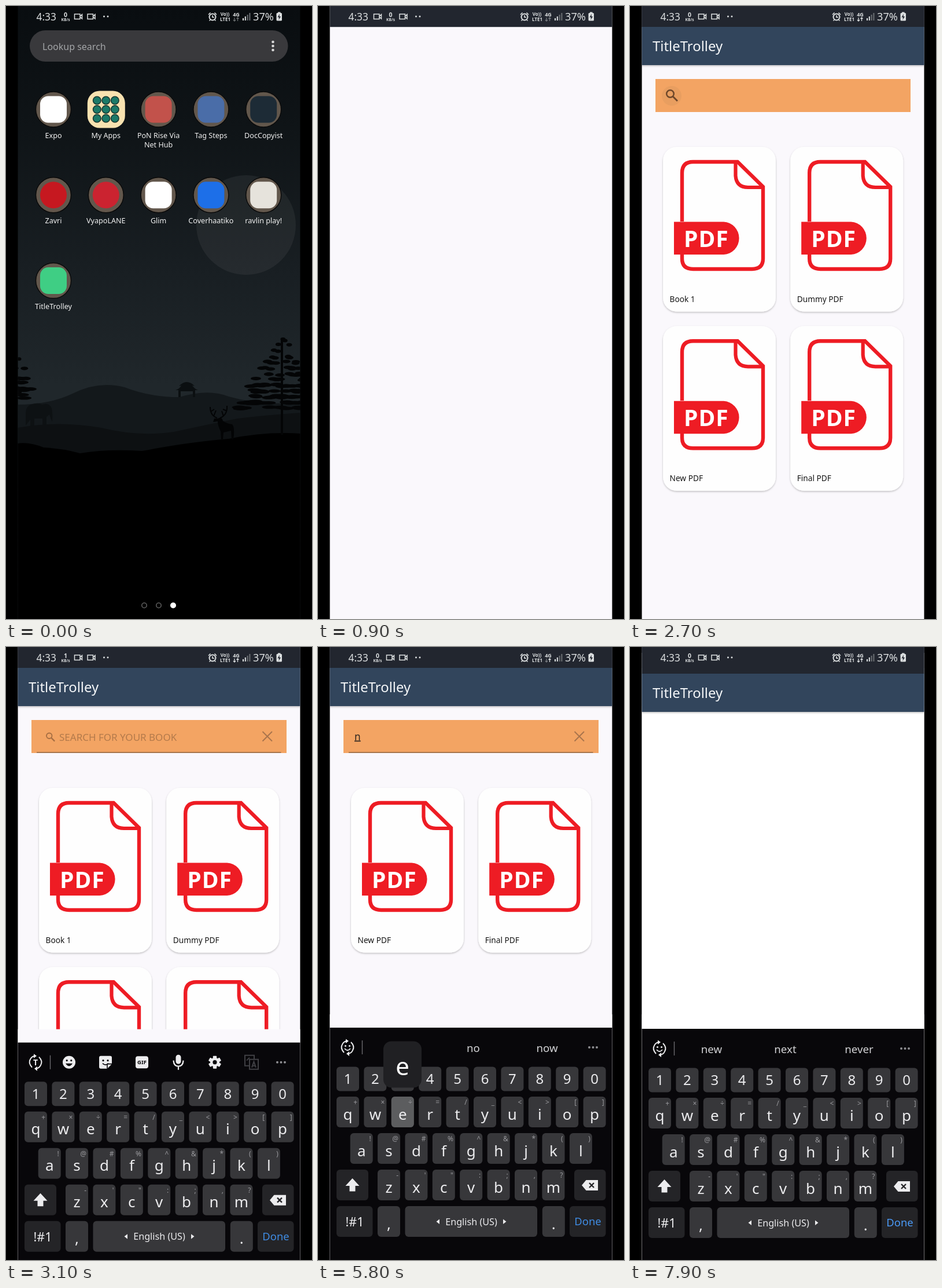
An HTML page that plays this animation: 529 by 1058 pixels, repeating every 8000 ms.

```html
<!DOCTYPE html>
<html lang="en">
<head>
<meta charset="utf-8">
<title>Book search on a phone</title>
<style>
html, body { margin: 0; width: 100%; height: 100%; overflow: hidden; background: #000; }
svg { display: block; width: 100vw; height: 100vh; font-family: "Noto Sans", "Open Sans", sans-serif; }
.line { fill: none; stroke: currentColor; }
</style>
</head>
<body>
<svg id="stage" viewBox="0 0 529 1058"></svg>
<script>
const LOOP = 8000, STEP = 100;
const PALE = '#faf8fc', RED = '#ee1c24', NAVY = '#30455c', ORANGE = '#f3a463', ICON = '#dcdfe0';

const text = (x, y, size, fill, s, more = '') =>
  `<text x="${x}" y="${y}" font-size="${size}" fill="${fill}" ${more}>${s}</text>`;
const mid = (x, y, size, fill, s, more = '') => text(x, y, size, fill, s, 'text-anchor="middle" ' + more);
const rect = (x, y, w, h, fill, r = 0, more = '') =>
  `<rect x="${x}" y="${y}" width="${w}" height="${h}" rx="${r}" fill="${fill}" ${more}/>`;
const dot = (x, y, r, fill, more = '') => `<circle cx="${x}" cy="${y}" r="${r}" fill="${fill}" ${more}/>`;
const path = (d, fill, more = '') => `<path d="${d}" fill="${fill}" ${more}/>`;
const line = (d, color, w, more = '') => `<path d="${d}" class="line" color="${color}" stroke-width="${w}" ${more}/>`;
const group = (id, body, more = '') => `<g id="${id}" ${more}>${body}</g>`;
const at = (x, y, body) => `<g transform="translate(${x} ${y})">${body}</g>`;

let seed = 7;
const rnd = () => (seed = seed * 16807 % 2147483647) / 2147483647;

// Home screen
function foliage(cx, top, height, spread, count) {
  let out = '';
  for (let i = 0; i < count; i++) {
    const k = Math.sqrt(rnd()), x = cx + (rnd() * 2 - 1) * (5 + k * spread);
    const y = top + Math.round(k * 12) / 12 * height + rnd() * 4;
    out += `<ellipse cx="${x.toFixed(1)}" cy="${y.toFixed(1)}" rx="${(4 + k * 9).toFixed(1)}" ry="3"/>`;
  }
  return `<g fill="#040506">${out}</g>`;
}

function wallpaper() {
  const pagoda = path('M293 663Q301 660 303 655L299 656Q306 649 312 649Q320 649 326 656L322 655Q325 660 332 663H327V675H323V665H302V675H298V663Z', '#0b0f11');
  const elephant = path('M34 724V704Q34 689 46 687Q56 684 63 688Q74 684 79 694Q81 704 80 718Q77 712 75 705Q72 708 70 709V726H63V712H49V726H42V714Z', '#0d1113');
  const deer = path('M366 712Q373 708 375 716Q382 721 391 722Q395 725 394 741L393 748H390L389 733L376 736L375 749H372L371 734Q366 724 366 717L358 718L360 712Z', '#030405')
    + line('M365 711Q353 707 353 692M354 700L360 696M370 711Q383 706 382 690M382 699L375 696M359 708L363 698M376 708L373 699', '#030405', 2);
  return rect(20, 0, 489, 1058, 'url(#sky)') + dot(415, 378, 86, '#fff', 'opacity=".055"')
    + path('M20 688Q75 688 115 669Q160 646 205 658Q248 675 300 675Q350 660 385 674Q440 690 509 684V800H20Z', '#13181b')
    + pagoda + elephant + foliage(18, 608, 66, 32, 30)
    + path('M20 728Q90 715 165 728Q230 744 290 735Q350 722 400 712Q450 706 509 702V800H20Z', '#0d1012')
    + path('M20 755Q40 752 65 762Q100 764 128 772Q175 764 235 768Q320 752 385 747Q450 734 509 738V1058H20Z', '#000')
    + deer + line('M477 573V740', '#040506', 4) + foliage(477, 574, 118, 72, 125);
}

const APPS = [
  ['Expo', '', '#fff', 1], ['My Apps', '', '', 2], ['PoN Rise Via', 'Net Hub', '#c2524b', 1],
  ['Tag Steps', '', '#4a6da8', 1], ['DocCopyist', '', '#1d2b36', 1], ['Zavri', '', '#c61820', 0],
  ['VyapoLANE', '', '#cb2330', 0], ['Glim', '', '#fff', 1], ['Coverhaatiko', '', '#1d6fe8', 1],
  ['ravlin play!', '', '#e6e3dc', 1], ['TitleTrolley', '', '#3fce84', 1]
];

function folder() {
  let out = rect(-32, -32, 65, 64, '#f8e2b0', 21);
  for (let i = 0; i < 9; i++)
    out += dot((i % 3 - 1) * 15.5, (Math.floor(i / 3) - 1) * 15.5, 6.8, '#1c7a68', 'stroke="#17352f" stroke-width="1.5"');
  return out;
}

function appIcon([name, second, color, kind], i) {
  const x = 82 + i % 5 * 90.8, y = 178.5 + Math.floor(i / 5) * 147.8;
  const tile = kind === 2 ? folder()
    : dot(0, 0, 30.5, '#62574c', 'stroke="#0a0a0a" stroke-width="1.5"')
      + (kind ? rect(-23, -23, 46, 46, color, 14) : dot(0, 0, 23, color));
  return at(x, y, (i === 10 ? group('tapped', tile) : tile)
    + mid(0, 49, 12.6, '#f2f2f2', name) + (second && mid(0, 65, 12.6, '#f2f2f2', second)));
}

const home = () => wallpaper() + rect(41, 42, 446.5, 54, '#39393c', 27)
  + text(63, 75.5, 16, '#a3a5a7', 'Lookup search')
  + [62, 69, 76].map(y => dot(461.5, y, 2.3, '#d8d8d8')).join('')
  + APPS.map(appIcon).join('')
  + [239, 264].map(x => dot(x, 1034.5, 4.2, 'none', 'stroke="#5c5c5c" stroke-width="1.6"')).join('')
  + dot(289, 1034.5, 5, '#fff');

// Status bar
function statusBar() {
  const cam = line('M-6.5 -4H3V4.5H-6.5ZM3 0L6.5 -3.5V4L3 .8', ICON, 1.5);
  const bold = 'font-weight="600"';
  const alarm = dot(0, 1, 5.5, 'none', `stroke="${ICON}" stroke-width="2"`)
    + line('M0 -2V1.5H3M-7 -3L-3.5 -6.5M7 -3L3.5 -6.5M-4 6L-5.5 7.5M4 6L5.5 7.5', ICON, 1.6);
  const bars = [4, 7, 10, 13].map((h, i) => rect(409 + i * 3.8, 25 - h, 2, h, i < 2 ? ICON : '#6c7074')).join('');
  return text(52.5, 24.5, 17.3, ICON, '4:33')
    + group('cam', cam) + at(147.5, 18, cam)
    + group('speed', mid(0, 18.5, 10.5, ICON, '0', bold + ' id="rate"') + mid(0, 25.5, 6.6, ICON, 'KB/s', bold))
    + dot(169.5, 18, 1.5, ICON) + dot(176, 18, 1.5, ICON)
    + at(357, 18, alarm)
    + mid(378.5, 17, 8, ICON, 'Vo))', bold) + mid(379, 25.5, 8, ICON, 'LTE1', bold) + mid(398, 18, 9, ICON, '4G', bold)
    + line('M395 20V26M393 24L395 26L397 24', ICON, 1.3, 'id="down"')
    + line('M400.5 26V20M398.5 22L400.5 20L402.5 22', ICON, 1.3, 'id="up"')
    + bars + text(427, 24.5, 18.2, ICON, '37%')
    + rect(467.5, 12, 9.5, 13.5, ICON, 1.5) + rect(470, 10.5, 4.5, 2, ICON)
    + path('M473 13.5L469.5 19.5H472L471.5 24L475 18H472.5Z', '#22262f');
}

// Book list
function pdfCard(i) {
  const page = line('M90 372V288Q90 269 109 269H186L230 312V436Q230 454 211 454H109Q90 454 90 436V428', RED, 6.4)
    + line('M182.5 269V293Q184 313 204 313H231', RED, 6.2)
    + path('M76 372.5H162A28.3 28.3 0 0 1 162 429H76Z', RED)
    + text(93, 416, 39, '#fff', 'PDF', 'font-weight="600" letter-spacing="1"');
  return group('card' + i, rect(57, 243, 195, 284.5, '#fefefe', 24, 'filter="url(#lift)"') + page
    + text(68.5, 511, 13.7, '#161616', '', `id="name${i}"`),
    `transform="translate(${i % 2 * 220.2} ${i > 1 ? 309.3 : 0})"`);
}

const glass = (x, y, s, color) => at(x, y, `<g transform="scale(${s})">`
  + dot(-3, -3, 6.3, 'none', `stroke="${color}" stroke-width="2.5"`) + line('M1.5 1.5L9.5 9.5', color, 2.9) + '</g>');

const header = () => rect(20, 0, 489, 36.2, '#22262f')
  + rect(20, 36, 489, 66, NAVY, 0, 'filter="url(#lift)"') + text(39, 78, 23.9, '#f4f6f8', 'TitleTrolley');

const app = () => rect(20, 0, 489, 1058, PALE, 0, 'id="blank"') + rect(20, 0, 489, 36.2, '#22262f')
  + group('content', header() + rect(44, 126, 441, 57, ORANGE)
    + group('closed', dot(72, 155, 17, '#8a6a48', 'id="ripple" opacity=".1"') + glass(72.5, 154.5, 1, '#6e472a'))
    + group('opened', line('M53 182H475.5', '#8f6744', 1.3) + line('M443.5 146L460 162.5M460 146L443.5 162.5', '#a9744c', 2)
      + group('hint', glass(77, 155.5, .75, '#a66e42') + text(92, 161.5, 17, '#b37a4b', 'SEARCH FOR YOUR BOOK'))
      + text(63, 160.5, 17.3, '#2e2620', '', 'id="typed" text-decoration="underline"'))
    + dot(264.5, 236, 20.6, 'none', `id="spinner" pathLength="1" stroke="${ORANGE}" stroke-width="5"`)
    + group('cards', [0, 1, 2, 3].map(pdfCard).join('') + rect(57, 243, 195, 284.5, '#000', 24, 'id="press" opacity=".1"')));

// Keyboard
const KEY = '#37373a', DARK = '#242427', INK = '#ececee';
const key = (x, y, label, hint) => rect(x, y, 39, 53, KEY, 6) + mid(x + 19.5, y + 39.5, 26, INK, label)
  + (hint ? text(x + 36, y + 14, 12, '#9a9a9e', hint, 'text-anchor="end"') : '');
const keyRow = (x, y, letters, hints) =>
  [...letters].map((c, i) => key(x + i * 47.4, y, c, hints[i].replace('&', '&amp;').replace('<', '&lt;'))).join('');

function tools() {
  const face = (r, fill, ink) => dot(0, 0, r, fill) + dot(-3.8, -3, 1.6, ink) + dot(3.8, -3, 1.6, ink)
    + path('M-6 2Q0 11 6 2Z', ink);
  let teeth = '';
  for (let a = 0; a < 360; a += 60) teeth += rect(-3.2, -11, 6.4, 7, INK, 1, `transform="rotate(${a})"`);
  return mid(51, 696.5, 14, INK, 'T', 'font-weight="700"') + at(109, 691, face(11, INK, '#08070a'))
    + at(172, 691, path('M-8 -11H8Q11 -11 11 -8V3L3 11H-8Q-11 11 -11 8V-8Q-11 -11 -8 -11Z', INK)
      + dot(-4, -3, 1.6, '#08070a') + dot(4, -3, 1.6, '#08070a') + line('M-5 2Q0 7 5 2M11 3H3V11', '#08070a', 1.6))
    + rect(224, 680.5, 22, 21, INK, 4) + mid(235, 694.8, 9.5, '#08070a', 'GIF', 'font-weight="700"')
    + rect(293.5, 678, 9, 16, INK, 4.5) + line('M289.5 688Q290 698 298 698T306.5 688M298 698V704', INK, 2.2)
    + at(361, 691, teeth + dot(0, 0, 8, INK) + dot(0, 0, 3.6, '#08070a'))
    + line('M422 697H413V679H429V685M421 686H436V703H421ZM425 700L428.500 690L432 700M426 697H431M416 688L421 683', '#3f3f43', 2);
}

const suggestions = () => dot(47.5, 688.5, 1.5, INK) + dot(54.5, 688.5, 1.5, INK) + line('M46 693Q51 699 56 693', INK, 1.8)
  + [141, 268.5, 396].map((x, i) => mid(x, 699, 18.7, '#d2d2d5', '', `id="word${i}"`)).join('');

const keyboard = () => rect(20, 657, 489, 402, '#08070a')
  + line('M45 700Q38 692 42 686Q44 681 50 680M57 682Q64 689 60 696Q58 701 52 702', INK, 2)
  + path('M48 676.500L53 680L48 684ZM54 698L49 702L54 706Z', INK) + line('M76.500 679V703', '#6a6a6e', 1.4)
  + [469, 475.5, 482].map(x => dot(x, 691, 2, '#8e8e92')).join('')
  + group('tools', tools()) + group('words', suggestions())
  + [...'1234567890'].map((c, i) => rect(32 + i * 47.4, 724.5, 39, 42, KEY, 6) + mid(51.5 + i * 47.4, 754, 24, INK, c)).join('')
  + keyRow(32, 776, 'qwertyuiop', '+×÷=/_<>[]')
  + keyRow(55.7, 839, 'asdfghjkl', '!@#%^&*()')
  + keyRow(103, 902, 'zxcvbnm', '-\'":;,?')
  + rect(32, 902, 55, 53, DARK, 6) + path('M59.500 917L71.500 930H64.500V939.500H54.500V930H47.500Z', INK)
  + rect(443, 902, 54.5, 53, DARK, 6) + path('M456 929L463.500 920H484V938H463.500Z', INK)
  + line('M469 925L477 933M477 925L469 933', DARK, 2.4)
  + rect(32, 965, 62.5, 53, DARK, 6) + mid(63.5, 1000, 21.5, INK, '!#1')
  + key(103, 965, ',') + rect(150.5, 965, 228.5, 53, KEY, 6) + mid(265, 997.5, 16.2, INK, 'English (US)')
  + path('M210 987.500V996L204.500 991.700ZM320 987.500V996L325.500 991.700Z', INK)
  + key(387.8, 965, '.') + rect(435, 965, 62.5, 53, DARK, 6) + mid(466.5, 998, 18.4, '#3f8be2', 'Done', 'id="done"')
  + group('lit', rect(126.8, 776, 39, 53, '#5c5d5f', 6) + mid(146.3, 815.5, 26, INK, 'e') + text(162.8, 790, 12, '#9a9a9e', '÷', 'text-anchor="end"'))
  + group('popup', rect(-33, 0, 66, 80, '#202023', 14) + mid(0, 58, 42, '#fff', '', 'id="popped"'));

document.getElementById('stage').innerHTML = `<defs>
  <linearGradient id="sky" x1="0" y1="0" x2="0" y2="1"><stop offset="0" stop-color="#090d10"/><stop offset=".2" stop-color="#0f1417"/><stop offset=".42" stop-color="#181e22"/><stop offset=".62" stop-color="#20272b"/></linearGradient>
  <filter id="lift" x="-10%" y="-10%" width="120%" height="125%"><feDropShadow dx="0" dy="1.5" stdDeviation="1.5" flood-opacity=".25"/></filter>
  <clipPath id="screen"><rect x="20.500" width="488" height="1058"/></clipPath></defs>`
  + group('phone', group('home', home()) + group('app', app())
    + rect(20, 634, 489, 440, PALE, 0, 'id="pad"')
    + group('viewer', rect(20, 0, 489, 1058, '#fff') + header())
    + group('keys', keyboard()) + statusBar(), 'clip-path="url(#screen)"');

// Timeline
const el = {};
document.querySelectorAll('[id]').forEach(e => el[e.id] = e);
const show = (id, on) => el[id].style.display = on ? '' : 'none';
const put = (id, s) => { if (el[id].textContent !== s) el[id].textContent = s; };
const set = (id, name, v) => el[id].setAttribute(name, v);
const shift = (id, x, y) => set(id, 'transform', `translate(${x} ${y})`);
const clamp = x => Math.min(1, Math.max(0, x));
const ease = x => { const u = 1 - (1 - clamp(x)) ** 1.5; return u * u * (3 - 2 * u); };

function spin(t) {
  const age = t - 980, c = age / 1333 % 1;
  const from = .75 * ease(2 * c - 1), len = .75 * ease(2 * c) - from + .012;
  set('spinner', 'stroke-dasharray', `${len} 1`);
  set('spinner', 'transform', `rotate(${from * 360 + 90 * c + age * 720 / 4444 - 116} 264.5 236)`);
}

function render(t) {
  const within = (a, b) => t >= a && t < b;

  const dip = within(100, 600) ? Math.sin((t - 50) / 550 * Math.PI) : 0;
  set('tapped', 'transform', `scale(${1 - .08 * dip})`);
  show('home', t < 900);
  show('app', t >= 800);
  set('blank', 'opacity', t < 900 ? .775 : 1);
  show('content', t >= 1100);

  const swapped = within(300, 2000);
  shift('cam', swapped ? 103 : 125, 18);
  shift('speed', swapped ? 125.5 : 103, 0);
  put('rate', within(3000, 3800) || within(7300, 7500) ? '1' : '0');
  const busy = within(2000, 3500) || t >= 7300;
  set('down', 'opacity', busy ? 1 : .45);
  set('up', 'opacity', busy || t >= 3500 ? 1 : .45);

  show('spinner', t < 2000);
  if (within(1100, 2000)) spin(t);

  const names = t < 4800 ? ['Book 1', 'Dummy PDF', 'New PDF', 'Final PDF']
    : t < 5900 ? ['New PDF', 'Final PDF'] : ['New PDF'];
  show('cards', t >= 2000);
  for (let i = 0; i < 4; i++) {
    show('card' + i, i < names.length);
    put('name' + i, names[i] || '');
  }
  show('press', t >= 7500);

  const typed = t < 4800 ? '' : t < 5900 ? 'n' : 'ne';
  show('ripple', t >= 2700);
  show('closed', t < 2800);
  show('opened', t >= 2800);
  show('hint', !typed);
  put('typed', typed);

  const rise = 401 * (1 - clamp((t - 2800) / 500)) ** 3;
  const drop = t >= 7900 ? 2 : 0;
  show('keys', t > 2800);
  show('pad', t > 2800);
  shift('keys', 0, rise + drop);
  shift('pad', 0, rise);
  show('tools', t < 4900);
  show('words', t >= 4900);
  (t < 6100 ? ['not', 'no', 'now'] : ['new', 'next', 'never']).forEach((w, i) => put('word' + i, w));
  set('done', 'fill', t < 7300 ? '#3f8be2' : '#4a99f6');

  const tapE = within(5800, 5900);
  show('popup', tapE || within(4700, 4800));
  show('lit', tapE);
  shift('popup', tapE ? 146 : 360, tapE ? 680.5 : 807);
  put('popped', tapE ? 'e' : 'n');

  const slide = clamp((t - 7600) / 400);
  show('viewer', t >= 7700);
  shift('viewer', 0, 160 * (1 - slide) ** 2);
  set('viewer', 'opacity', clamp(slide * 1.8));
}

function tick() {
  render(Math.floor(performance.now() % LOOP / STEP) * STEP);
  requestAnimationFrame(tick);
}
tick();
</script>
</body>
</html>
```
